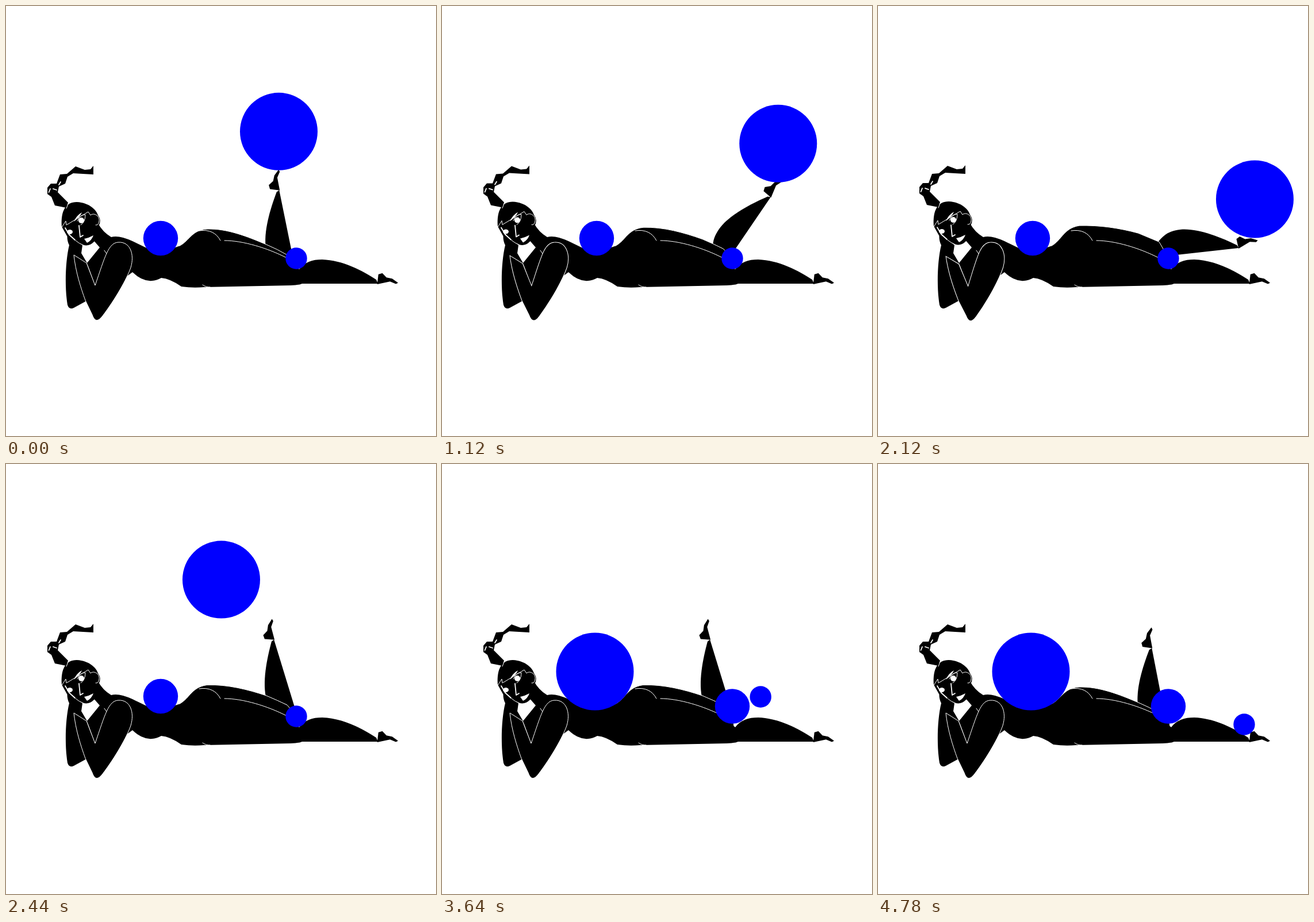
These frames come from a looping animation (748 px wide and 748 px high, 4.8 s). An HTML page:

```html
<!DOCTYPE html>
<html lang="en">
<head>
<meta charset="utf-8">
<title>Balls</title>
<style>
  html, body { margin: 0; height: 100%; overflow: hidden; background: #fff; }
  svg { display: block; width: 100%; height: 100%; }
  .line { fill: none; stroke: #fff; stroke-linecap: round; stroke-linejoin: round; }
  .bold { stroke-width: 1.8; }
  .white { fill: #fff; }
  circle { fill: #00f; }
</style>
</head>
<body>
<svg viewBox="0 0 748 748">
  <defs><path id="foot" d="M0,1L-3,-16L3,-20L12,-15L22,-16L34,-12L31,-9L20,-10Z"/></defs>

  <g id="shin">
    <path d="M-15,-25C-2,-38 8,-43 28,-43C58,-42 95,-22 122,-5L124,0H0Z"/>
    <use id="toes" href="#foot"/>
  </g>
  <path id="thigh" stroke="#fff"/>

  <!-- torso and resting leg -->
  <path d="M160,378Q168,393 183,402Q196,398 220,409L255,426Q285,424 300,418L380,408
    C412,408 455,421 488,438L510,458C520,445 533,441 550,441C585,442 620,460 644,476L647,483
    H515Q508,486 495,486L345,489Q325,491 305,488Q285,474 270,473Q245,487 220,463L209,471
    L155,486L141,447L163,420L150,405Z"/>
  <use href="#foot" transform="translate(646 483) rotate(17)"/>
  <path class="line" d="M380,408C412,408 455,421 488,438M336,391Q362,387 373,408M342,485Q347,489 355,489M171,425L175,431"/>

  <!-- hand with the far arm -->
  <path d="M107,392Q105,407 110,416C103,445 102,490 107,520Q110,529 118,525L140,513L152,485L141,447L131,430L133,416Z"/>

  <g id="head">
    <path d="M152,278V293L134,292L117,291L107,297L103,309L92,314L90,324L108,342L105,351L85,347L79,332L72,327
      V316L78,309H88L94,293L106,292L121,279L137,285L147,284Z"/>
    <path class="line bold" d="M74.500,324L77,318M82,318L88,320M92,311L95,306"/>
    <path d="M97,384C95,356 104,341 123,341C146,342 158,356 160,364Q167,373 161,383C163,396 160,405 152,411C147,417 137,418 131,414L106,400Z"/>
    <path class="line" d="M105,352L109,342M97,385L104,374L105,381L143,358L147,364C152,359 163,364 162,374Q161,382 156,381
      M124,374Q129,362 138,363Q138,376 130,381M134,416Q127,413 121,408"/>
    <path class="line bold" d="M103,386L110,398L120,407M127,382L129,402L134,399"/>
    <path class="white" d="M118,375Q123,364 132,359Q129,367 118,375ZM136,405Q145,403 152,399Q149,408 141,412Z"/>
    <ellipse class="white" cx="131" cy="373" rx="5" ry="5"/>
    <ellipse class="white" cx="111" cy="393" rx="5" ry="4"/>
  </g>

  <path id="arm" stroke="#fff" d="M118,433C121,462 130,490 138,512L150,537Q156,555 168,539
    C190,510 210,475 217,455C224,432 216,410 196,411C178,411 172,437 155,486L140,447Z"/>

  <circle id="big" r="67.500"/>
  <circle id="medium" r="30.200"/>
  <circle id="small" r="18.700"/>
</svg>
<script>
const LOOP = 4800;
const el = id => document.getElementById(id);
const move = (id, transform) => el(id).setAttribute('transform', transform);
const place = (id, [x, y]) => move(id, `translate(${x} ${y})`);

const part = (t, from, to) => Math.min(1, Math.max(0, (t - from) / (to - from)));
const ease = (t, from, to) => (1 - Math.cos(Math.PI * part(t, from, to))) / 2;
const mix = (a, b, p) => a + (b - a) * p;
const slide = (a, b, p) => [mix(a[0], b[0], p), mix(a[1], b[1], p)];
// Ballistic arc of the given height; px is the progress across.
const hop = (a, b, p, height, px = p) =>
  [mix(a[0], b[0], px), mix(a[1], b[1], p) - 4 * height * p * (1 - p)];

const RELEASE = 2160, CATCH = 2740;

function pose(t) {
  const raise = ease(t, 0, 540), lower = ease(t, 640, 1640);
  const kick = ease(t, 2080, 2440), relax = ease(t, 4300, 4790);
  const lift = lower - .4 * kick - .6 * relax;
  return {
    lower, lift,
    sway: lower - kick,
    angle: -101.5 - raise + 99.5 * lower - 104 * kick + 6 * relax,
    x: 500 + 4 * lift,
    y: 442 - 7 * raise - 11 * kick + 18 * relax,
  };
}

// The ball sits above the toes and rolls a little along the lowered foot.
function onFoot(t, { angle, lower, x, y }) {
  const a = (angle + 4 - 9.5 * lower) * Math.PI / 180, r = 157 - 7 * lower;
  const roll = 20 * Math.sin(Math.PI * part(t, 1640, RELEASE));
  return [x + r * Math.cos(a) - 5 * (1 - lower) + roll, y + r * Math.sin(a) - 68];
}

function bigBall(t) {
  if (t < RELEASE) return onFoot(t, pose(t));
  const landing = [216, 338], p = part(t, RELEASE, CATCH);
  if (p < 1) return hop(onFoot(RELEASE, pose(RELEASE)), landing, p, 124, 1 - (1 - p) ** 1.5);
  return slide(landing, [266, 361], ease(t, CATCH, 3400));
}

const mediumBall = t => hop([269, 404], [505, 421.5], part(t, 2816, 3284), 95);

function smallBall(t) {
  const landing = [598, 435], p = part(t, 3440, 3820);
  if (p < 1) return hop([505, 439], landing, p, 32);
  return slide(landing, [637, 453], 1 - (1 - part(t, 3820, 4140)) ** 2);
}

function draw(t) {
  const { angle, lift, sway, x, y } = pose(t);
  move('shin', `translate(${x} ${y}) rotate(${angle})`);
  move('toes', `translate(124 0) rotate(${-.27 * angle + 2})`);
  el('thigh').setAttribute('d', `M296,420C320,411 320,${390 - 3 * lift} 350,${388 - 6 * lift}
    C385,${387 - 6 * lift} 420,${401 - 15 * lift} 453,${415 - 20 * lift}
    Q472,${423 - 20 * lift} 489,${433 - 23 * lift}L505,438L508,456L380,440Z`);
  move('arm', `rotate(${-1.7 * sway} 200 430)`);
  place('head', [0, -sway]);
  place('big', bigBall(t));
  place('medium', mediumBall(t));
  place('small', smallBall(t));
}

const start = performance.now();
function frame() {
  draw((performance.now() - start) % LOOP);
  requestAnimationFrame(frame);
}
frame();
</script>
</body>
</html>
```
